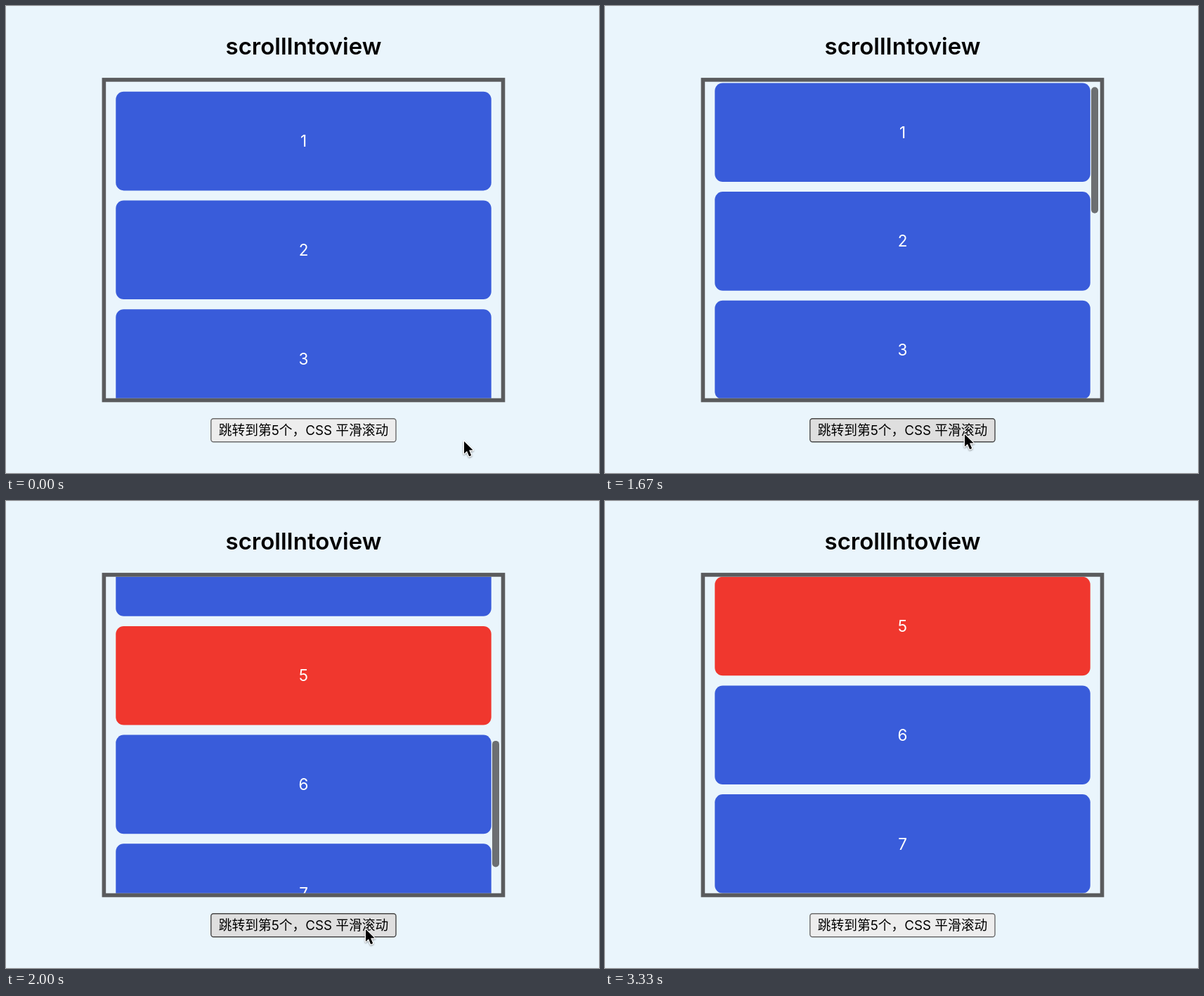
Animation of 844x664 px, one loop 4 s. Source, as an HTML page:

```html
<!DOCTYPE html>
<html lang="zh-CN">
<head>
<meta charset="utf-8">
<title>scrollIntoview</title>
<style>
  html, body { margin: 0; width: 100%; height: 100%; overflow: hidden; background: #eaf5fc; }
  svg { display: block; width: 844px; height: 664px; font-family: Inter, "Noto Sans CJK SC", "Noto Sans CJK", sans-serif; text-anchor: middle; }
  .title { font-size: 33px; font-weight: 600; }
  .card { fill: #395cda; }
  .card.target { fill: #f0372e; }
  .number { font-size: 22.5px; fill: #fff; }
  #button { fill: #ededed; stroke: #6b6b6b; stroke-width: 1.4; }
  #button.hover { fill: #dfdfdf; stroke: #474747; }
  .label { font-size: 18.75px; }
  #cursor { stroke: #fff; stroke-width: 2.6; stroke-linejoin: round; paint-order: stroke; filter: drop-shadow(0 1px 1px #0006); }
</style>
</head>
<body>
<svg viewBox="0 0 844 664">
  <clipPath id="view"><rect x="142.2" y="107.7" width="562.5" height="450"/></clipPath>
  <text class="title" x="423.5" y="68.5">scrollIntoview</text>
  <g clip-path="url(#view)">
    <g id="list"></g>
    <rect id="thumb" x="692" width="10" height="179.5" rx="5" fill="#6c6f72"/>
  </g>
  <rect x="139.4" y="104.9" width="568.1" height="455.6" fill="none" stroke="#5a5b5d" stroke-width="5.6"/>
  <rect id="button" x="291.8" y="586.7" width="263.2" height="33" rx="3.5"/>
  <text class="label" x="423.5" y="610">跳转到第5个，CSS 平滑滚动</text>
  <path id="cursor" d="M0 1V18.4L4 14.7L7.2 22.2L10.2 20.9L7.1 13.6H12.6Z"/>
</svg>
<script>
const LOOP = 4000, UNIT = 1.40625, SCROLL = 450 * UNIT;
const $ = id => document.getElementById(id);
const [list, thumb, button, cursor] = ['list', 'thumb', 'button', 'cursor'].map($);

list.innerHTML = [1, 2, 3, 4, 5, 6, 7].map((n, i) => {
  const top = 121.8 + i * 110 * UNIT;
  return `<rect class="card${n === 5 ? ' target' : ''}" x="156.3" y="${top}" width="534.4" height="140.6" rx="11.25"/>
    <text class="number" x="423.5" y="${top + 78.4}">${n}</text>`;
}).join('');

const progress = (t, start, end) => Math.min(1, Math.max(0, (t - start) / (end - start)));
const smooth = p => p * p * (3 - 2 * p);
const mix = (a, b, p) => a + (b - a) * p;

// Eased curve cubic-bezier(.38, 0, .564, 1), solved by bisection
function scrollEase(x) {
  let low = 0, high = 1;
  for (let i = 0; i < 24; i++) {
    const s = (low + high) / 2, u = 1 - s;
    if (1.14 * u * u * s + 1.692 * u * s * s + s ** 3 < x) low = s; else high = s;
  }
  return smooth((low + high) / 2);
}

function pointer(t) {
  if (t < 2420) {
    const p = smooth(progress(t, 580, 1180));
    return [mix(652, 512, p), mix(618, 608, p)];
  }
  if (t < 2750) {
    const p = smooth(progress(t, 2420, 2700));
    const bend = (a, b, c) => mix(mix(a, b, p), mix(b, c, p), p);
    return [bend(512, 600, 702), bend(608, 632, 586)];
  }
  const p = progress(t, 2750, 3305) ** 4.5;
  return [mix(702, 858, p), mix(586, 80, p)];
}

function draw(now) {
  const t = now % LOOP;
  const offset = SCROLL * scrollEase(progress(t, 1626, 2121));
  list.setAttribute('transform', `translate(0 ${-offset})`);
  thumb.setAttribute('y', 110.2 + offset * 0.41);
  thumb.setAttribute('opacity', t < 1640 ? 0 : 1 - progress(t, 2640, 2880));

  const [x, y] = pointer(t);
  cursor.setAttribute('transform', `translate(${x} ${y})`);
  button.classList.toggle('hover', x > 291 && x < 555 && y > 586 && y < 620);
  requestAnimationFrame(draw);
}
draw(performance.now());
</script>
</body>
</html>
```
